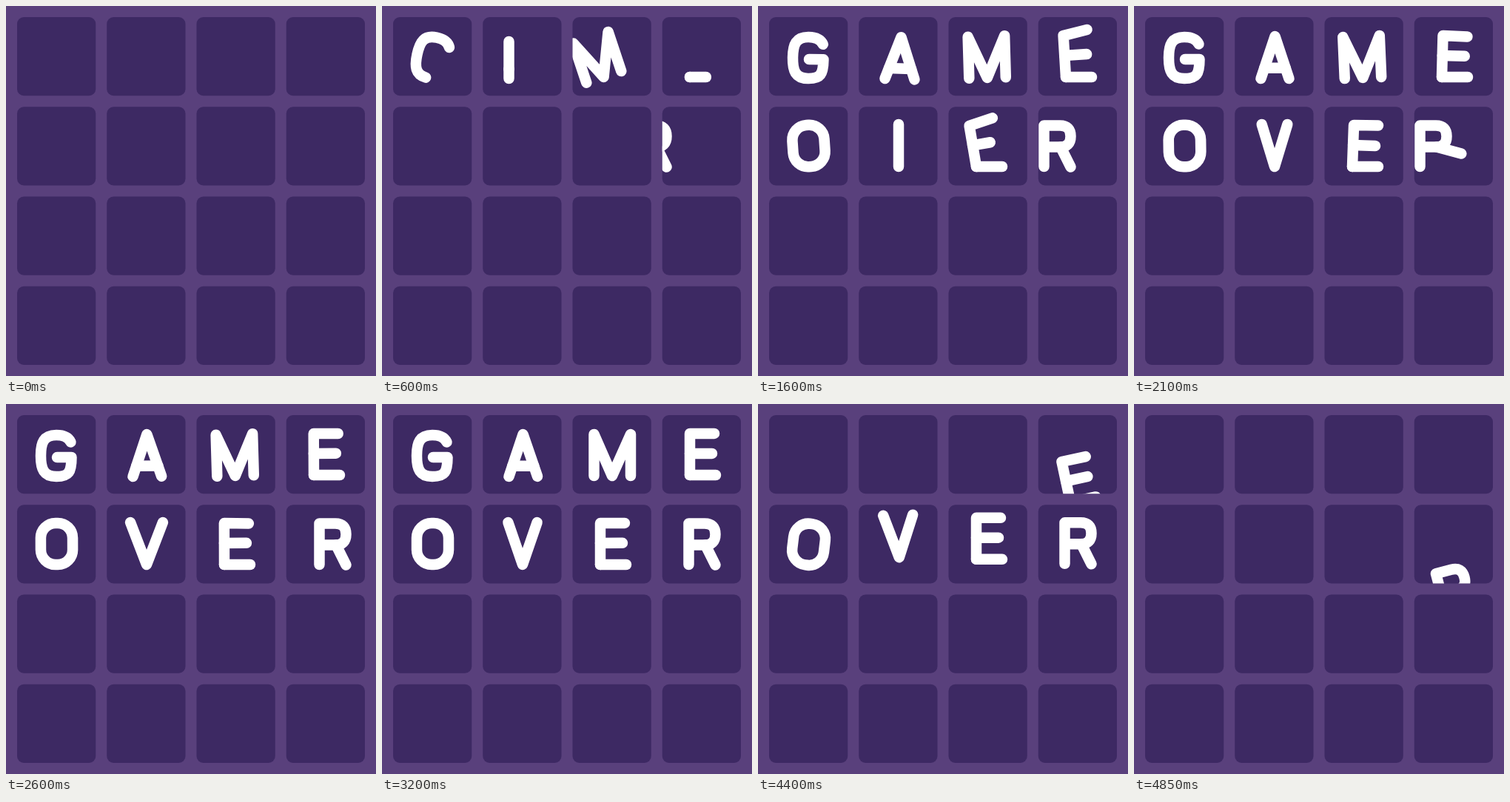
Animation of 500x500 px, one loop 4.9 s. Source, as an HTML page with a canvas:

```html
<!DOCTYPE html>
<html>
<head>
<meta charset="utf-8">
<style>
html, body { margin: 0; width: 100%; height: 100%; overflow: hidden; background: #59407c; }
canvas { display: block; }
</style>
</head>
<body>
<canvas id="stage" width="500" height="500"></canvas>
<script>
const ctx = document.getElementById('stage').getContext('2d');
const LOOP = 4900, STEP = 50, TILE = 106.25, PITCH = 121.25, STROKE = 14.5;
const RAD = Math.PI / 180;

const ramp = (t, from, to) => Math.min(1, Math.max(0, (t - from) / (to - from)));
const smooth = u => u * u * (3 - 2 * u);
// Damped swing from 1 to 0, starting at the given time
const swing = (t, start) => {
  const d = Math.max(0, t - start);
  return Math.exp(-0.0029 * d) * Math.cos(Math.PI * d / 680);
};
const polar = ([x, y], angle, length) =>
  [x + length * Math.cos(angle * RAD), y + length * Math.sin(angle * RAD)];
const mix = (a, b, u) => [a[0] + (b[0] - a[0]) * u, a[1] + (b[1] - a[1]) * u];

function line(...points) {
  ctx.beginPath();
  points.forEach(p => ctx.lineTo(...p));
  ctx.stroke();
}

function turn(x, y, degrees, scale = 1) {
  ctx.translate(x, y);
  ctx.rotate(degrees * RAD);
  ctx.scale(scale, scale);
  ctx.translate(-x, -y);
}

function drawG(t) {
  const drawn = ramp(t, 50, 920);
  if (!drawn) return;
  const path = new Path2D('M87.5 51.5Q83 42 68 42C51 42 47 52 47 70S51 98 68 98S88.500 92 88.500 72H69');
  turn(68, 70, 36 * swing(t, 400));
  if (drawn < 1) ctx.setLineDash([160 * drawn, 400]);
  ctx.stroke(path);
}

function drawA(t) {
  const grown = ramp(t, 300, 660);
  if (!grown) return;
  const length = 60 * grown, foot = [171.5, 98];
  const lean = 18.5 * (1 - swing(t, 1080));
  const spread = 37.5 * (1 - swing(t, 700));
  const apex = polar(foot, lean - 90, length);
  const other = polar(apex, 90 + lean - spread, length);
  line(foot, apex, other);
  line(mix(apex, foot, 0.75), mix(apex, other, 0.75));
}

function drawM(t) {
  const left = (1 - ramp(t, 320, 970)) ** 3;
  if (t < 320) return;
  const sway = Math.sin(Math.PI * ramp(t, 1150, 3050));
  ctx.translate(-110 * left - 3 * sway, 2 * left);
  turn(311, 69, -100 * left - 2.5 * sway);
  line([286.5, 97], [286.5, 41], [311, 97], [336, 41], [336, 97]);
}

// Folding E: the base grows, then the spine and the top arm swing open
function drawE(t, x, y, start) {
  const time = t - start, base = ramp(time, 0, 160);
  if (!base) return;
  const foot = [x, y];
  line(foot, [x + 35 * base, y]);
  const tilt = 90 * swing(time, 200);
  const top = polar(foot, tilt - 90, 56 * ramp(time, 200, 350));
  const fold = 110 * swing(time, 400);
  line(foot, top, polar(top, fold, 33 * ramp(time, 330, 480)));
  const middle = ramp(time, 750, 1000);
  if (middle) {
    const root = mix(foot, top, 0.52);
    line(root, polar(root, tilt, 30 * middle));
  }
}

function drawO(t) {
  const time = t - 610;
  if (time < 0) return;
  const scale = 1 - Math.exp(-0.003 * time) * Math.cos(Math.PI * time / 285);
  turn(68.5, 189, -85 * Math.exp(-0.0031 * time), Math.max(0, scale));
  ctx.beginPath();
  ctx.roundRect(47, 161, 43, 56, 20);
  ctx.stroke();
}

function drawV(t) {
  const size = ramp(t, 1000, 1120);
  if (!size) return;
  const fall = smooth(ramp(t, 1300, 1600));
  const open = 20 * (1 - swing(t, 1825));
  const y = 158 + 2 * fall, tip = [190, y + 0.01 + 57 * fall];
  ctx.lineWidth = 28.5 * size + (STROKE - 28.5) * fall;
  line([190 - open, y], tip, [190 + open, y]);
}

// R walks in: the leg reaches forward, then the body follows
function drawR(t) {
  const step = Math.min(2, Math.floor(t / 950)), time = t - 950 * step;
  const stride = step < 2 ? 38 : 28;
  const reach = ramp(time, 50, 350), follow = smooth(ramp(time, 350, 600));
  const extra = step < 2 ? 0 : 14 * Math.sin(Math.PI * ramp(time, 350, 800));
  ctx.translate(-104 + 38 * step + stride * follow + extra, 0);
  ctx.stroke(new Path2D('M414.5 217V161.500H436Q450.500 161.500 450.500 176T436 190.500H414.500'));
  const ahead = stride * (Math.sin(reach * Math.PI / 2) - follow);
  line([437, 190.5], [450.5 + ahead, 217.5 - 18 * Math.sin(Math.PI * reach)]);
}

const letters = [
  drawG, drawA, drawM, t => drawE(t, 416, 96, 500),
  drawO, drawV, t => drawE(t, 295, 217, 650), drawR
];

function drawTile(i, t) {
  const x = 15 + (i % 4) * PITCH, y = 15 + Math.floor(i / 4) * PITCH;
  ctx.save();
  ctx.beginPath();
  ctx.roundRect(x, y, TILE, TILE, 9);
  ctx.fillStyle = '#3d2963';
  ctx.fill();
  if (letters[i]) {
    ctx.clip();
    // Hop up, then drop out of the tile while tipping over
    const start = 3650 + 100 * i, out = ramp(t, start, start + 550);
    ctx.translate(0, 100 * (2.70158 * out ** 3 - 1.70158 * out ** 2));
    turn(x + TILE / 2, y + TILE / 2, (i % 2 ? -29 : 29) * Math.max(0, out - 0.4));
    ctx.strokeStyle = '#fff';
    ctx.lineWidth = STROKE;
    ctx.lineCap = ctx.lineJoin = 'round';
    if (out < 1) letters[i](t);
  }
  ctx.restore();
}

function frame() {
  const t = Math.floor(performance.now() % LOOP / STEP) * STEP;
  ctx.fillStyle = '#59407c';
  ctx.fillRect(0, 0, 500, 500);
  for (let i = 0; i < 16; i++) drawTile(i, t);
  requestAnimationFrame(frame);
}
frame();
</script>
</body>
</html>
```
